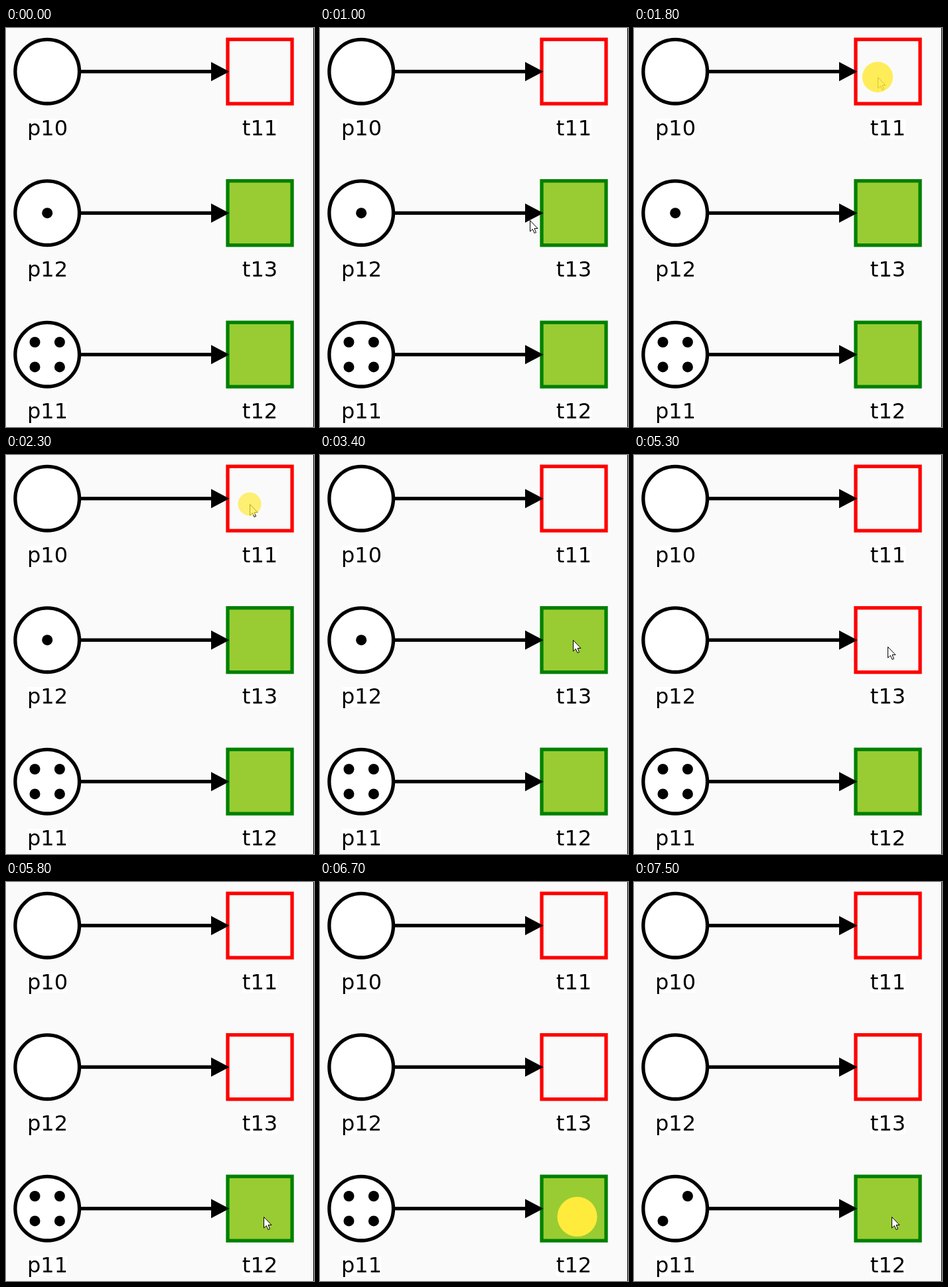
Write an HTML page with a canvas that moves like this. It is 464x602 px and loops after 8000 ms.

```html
<!DOCTYPE html>
<html lang="en">
<head>
<meta charset="utf-8">
<title>Petri net</title>
<style>
html, body { margin: 0; width: 100%; height: 100%; overflow: hidden; background: #fafafa; }
canvas { display: block; }
</style>
</head>
<body>
<canvas id="stage" width="464" height="602"></canvas>
<script>
const ctx = document.getElementById('stage').getContext('2d');
const LOOP = 8000, STEP = 100;
const LINE = 5.3, SIDE = 97;
const D = 18.7;
const TOKENS = [
  [],
  [[0, 0]],
  [[D, -D], [-D, D]],
  [[D, -D], [0, 0], [-D, D]],
  [[-D, -D], [D, -D], [-D, D], [D, D]]
];
// start, end, from, to
const MOVES = [
  [700, 1500, [297, 368], [367, 74]],
  [2700, 3400, [366, 74], [381, 279]],
  [5200, 5800, [382, 280], [387.5, 505]]
];
const CLICKS = [1745, 2200, 4300, 6700, 6900];

function disc(x, y, r, color) {
  ctx.beginPath();
  ctx.arc(x, y, r, 0, 7);
  ctx.fillStyle = color;
  ctx.fill();
}

function polygon(points, color) {
  ctx.beginPath();
  points.forEach(([x, y]) => ctx.lineTo(x, y));
  ctx.closePath();
  ctx.fillStyle = color;
  ctx.fill();
}

function label(text, x, y, width) {
  ctx.fillStyle = '#fff';
  ctx.fillRect(x - width / 2, y - 25, width, 30);
  ctx.fillStyle = '#000';
  ctx.fillText(text, x, y);
}

function row(y, place, transition, count) {
  ctx.lineWidth = LINE;
  ctx.strokeStyle = '#000';
  disc(62.2, y, 48.3, '#fff');
  ctx.stroke();
  for (const [dx, dy] of TOKENS[count]) disc(62.2 + dx, y + dy, 8, '#000');

  const box = [382.5 - SIDE / 2, y - SIDE / 2, SIDE, SIDE];
  if (count) {
    ctx.fillStyle = '#9c3';
    ctx.fillRect(...box);
  }
  ctx.strokeStyle = count ? '#008000' : '#f00';
  ctx.strokeRect(...box);

  ctx.fillStyle = '#000';
  ctx.fillRect(111, y - LINE / 2, 200, LINE);
  polygon([[309, y - 14.5], [336.5, y], [309, y + 14.5]], '#000');
  const baseline = Math.round(y + 96);
  label(place, 62.5, baseline, 59);
  label(transition, 382.5, baseline, 53);
}

function pointerAt(t) {
  const move = MOVES.filter(m => t >= m[0]).pop();
  if (!move) return null;
  const [start, end, from, to] = move;
  const p = Math.min(1, (t - start) / (end - start));
  const k = p * p / (p * p + (1 - p) ** 2);
  return from.map((v, i) => v + (to[i] - v) * k);
}

function drawPointer(x, y) {
  ctx.save();
  ctx.translate(Math.round(x) + .5, Math.round(y) + .5);
  polygon([[0, 0], [0, 16.5], [3.8, 13], [6.5, 19], [9, 18], [6.5, 12], [11.5, 12]], '#fff');
  ctx.lineWidth = 1;
  ctx.strokeStyle = '#000';
  ctx.stroke();
  ctx.restore();
}

function drawClick(t, x, y) {
  const age = t - CLICKS.filter(c => t >= c).pop();
  if (!(age < 200)) return;
  const r = 30 - age / 8;
  ctx.globalAlpha = .3 + .7 * r / 30;
  disc(x, y, r, '#ffeb3b');
  ctx.globalAlpha = 1;
}

function draw(now) {
  const t = Math.floor(now % LOOP / STEP) * STEP;
  ctx.fillStyle = '#fafafa';
  ctx.fillRect(0, 0, 464, 602);
  ctx.fillStyle = '#000';
  ctx.fillRect(463, 0, 1, 602);
  ctx.font = '32px "DejaVu Sans", Verdana, sans-serif';
  ctx.textAlign = 'center';

  row(65.7, 'p10', 't11', 0);
  row(279.2, 'p12', 't13', t < 4600 ? 1 : 0);
  row(492.7, 'p11', 't12', t < 7000 ? 4 : t < 7500 ? 3 : 2);

  const pointer = pointerAt(t);
  if (pointer) {
    drawPointer(...pointer);
    drawClick(t, ...pointer);
  }
  requestAnimationFrame(draw);
}
requestAnimationFrame(draw);
</script>
</body>
</html>
```
